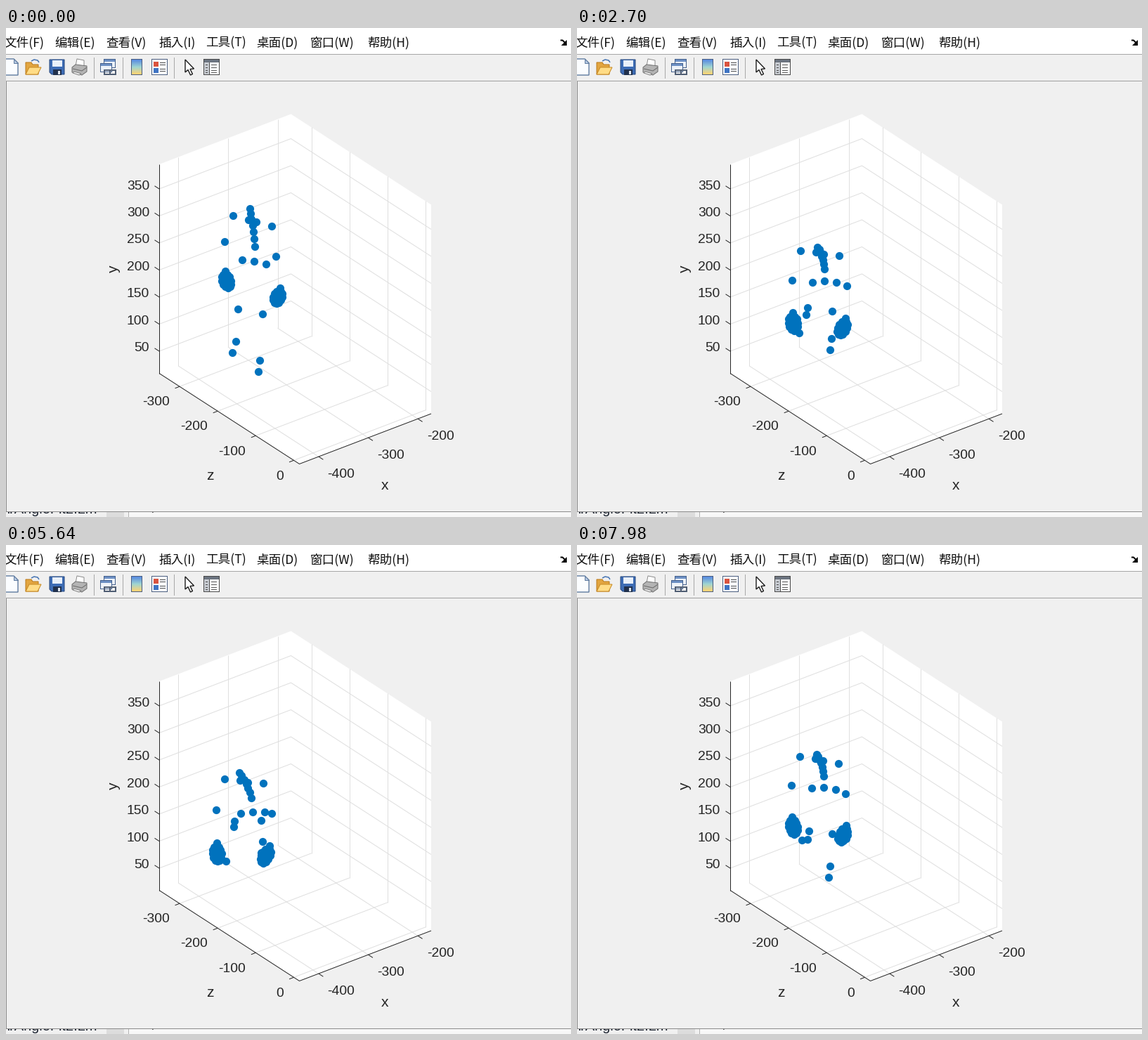
A matplotlib script for the animation above (8000 ms loop, 804 by 696 pixels).

```python
import numpy as np
import matplotlib.pyplot as plt
from matplotlib.animation import FuncAnimation
from matplotlib.patches import Polygon, Rectangle

W, H, DPI = 804, 696, 96
LOOP, STEP = 8000, 50
INK, BLUE, PANEL, GRID = "#262626", "#0072BD", "#f0f0f0", "#dfdfdf"
PT = 72 / DPI

plt.rcParams["toolbar"] = "None"
fig = plt.figure(figsize=(W / DPI, H / DPI), dpi=DPI)
ax = fig.add_axes([0, 0, 1, 1])
ax.set_xlim(0, W)
ax.set_ylim(H, 0)
ax.axis("off")


# ---------- drawing helpers (pixel coordinates) ----------
def box(x0, y0, x1, y1, fill, edge=None, z=1):
    """Fill whole pixels x0..x1, y0..y1, with an optional one-pixel edge."""
    if edge:
        box(x0, y0, x1, y1, edge, z=z)
        x0, y0, x1, y1 = x0 + 1, y0 + 1, x1 - 1, y1 - 1
    ax.add_patch(Rectangle((x0, y0), x1 - x0 + 1, y1 - y0 + 1,
                           fc=fill, lw=0, zorder=z, antialiased=False))


def poly(pts, fill, edge="none", lw=1, z=1):
    ax.add_patch(Polygon(pts, closed=True, fc=fill, ec=edge, lw=lw * PT, zorder=z))


def line(pts, color, lw=1, z=1):
    xs, ys = zip(*pts)
    ax.plot(xs, ys, color=color, lw=lw * PT, zorder=z, solid_capstyle="butt")


def text(x, y, s, px, font="Liberation Sans", color=INK, ha="left", z=1, **kw):
    ax.text(x, y, s, fontsize=px * PT, family=font, color=color, ha=ha,
            va=kw.pop("va", "baseline"), zorder=z, **kw)


# ---------- window ----------
def draw_window():
    box(0, 680, 803, 695, PANEL, z=0)
    box(143, 680, 167, 695, "#dcdcdc", z=0)
    box(174, 680, 803, 695, "#f7f7f7", z=0)
    box(174, 680, 174, 695, "#b4b4b4", z=0)
    text(-5, 691, "nrAngleFit2.Lm", 20, color="#1d2430", z=0.2)
    text(207, 690, "r", 16, color="#444444", z=0.2)
    box(0, 0, 803, 687, PANEL, z=0.5)
    box(0, 688, 803, 688, "#8c8c8c", z=0.5)
    box(0, 0, 803, 36, "white")
    box(0, 37, 803, 37, "#a6a6a6")
    box(0, 75, 803, 75, "#a0a0a0")
    box(0, 76, 0, 687, "#8c8c8c")
    menu = [(-2, "文件(F)"), (70, "编辑(E)"), (143, "查看(V)"), (218, "插入(I)"),
            (285, "工具(T)"), (357, "桌面(D)"), (434, "窗口(W)"), (515, "帮助(H)")]
    for x, s in menu:
        text(x - 0.7, 26.8, s, 17.6, font="Noto Sans CJK JP", color="#101010")
    line([(789, 17.5), (792, 17.5), (796, 21.5)], "black", 2)
    poly([(798, 17), (798, 25), (790, 25)], "black")


def draw_toolbar():
    for x in (125, 166, 239):
        box(x, 42, x, 71, "#a8a8a8")
    # new page
    poly([(-2, 44), (11, 44), (17, 50), (17, 67), (-2, 67)], "#fbfdff", "#5f7ba0", 1.4)
    poly([(11, 44), (11, 50), (17, 50)], "#b9cbe4", "#5f7ba0")
    # folder
    poly([(28, 66), (28, 49), (36, 49), (38, 52), (46, 52), (46, 66)],
         "#e2a540", "#b97818")
    poly([(28, 66), (33, 56), (50, 56), (45, 66)], "#ffdc86", "#c88a24")
    line([(36, 47), (40, 45), (45, 46), (47, 49)], "#4b78b4", 1.6)
    # disk
    poly([(62, 45), (83, 45), (83, 66), (65, 66), (62, 63)], "#3d6cb5", "#26477e")
    box(66, 46, 79, 54, "#e9f0fa")
    box(67, 59, 78, 66, "#20304c")
    box(74, 61, 76, 65, "#dfe6f0")
    # printer
    poly([(99, 54), (101, 44), (111, 46), (111, 55)], "white", "#8c8c8c")
    poly([(94, 56), (99, 52), (115, 54), (115, 62), (108, 67), (94, 63)],
         "#b4b4b4", "#707070")
    line([(95, 58), (108, 61), (115, 56)], "#6a6a6a")
    poly([(97, 62), (107, 65), (104, 67), (95, 64)], "#f3f3f3", "#808080")
    # linked windows
    for x, y in ((139, 44), (134, 50)):
        box(x, y, x + 16, y + 12, "#eef3fa", "#45618d")
        box(x + 1, y + 1, x + 15, y + 3, "#6d90c4")
    for x in (140, 148):
        ax.add_patch(Rectangle((x, 60), 8, 6, fill=False, ec="#4f5d73", lw=2 * PT))
    # colour bar
    cool, pale, warm = map(np.array, ((.35, .55, .88), (.62, .83, .82), (1, .83, .45)))
    box(178, 44, 193, 66, "white", "#4c5f80")
    for k in range(21):
        u = k / 10
        c = cool + (pale - cool) * u if u < 1 else pale + (warm - pale) * (u - 1)
        box(179, 45 + k, 192, 45 + k, tuple(c))
    # legend
    box(207, 44, 229, 66, "#fafcff", "#4c5f80")
    box(210, 48, 216, 54, "#d9533f")
    box(210, 57, 216, 63, "#3f74c4")
    for y in (49, 52, 58, 61):
        box(219, y, 226, y, "#4a4a4a")
    # pointer
    poly([(255, 45), (255, 63), (259, 59.5), (262.5, 67), (265.5, 65.5),
          (262, 58.5), (267.5, 58)], "white", "#1c1c1c", 1.4)
    # inspector
    box(281, 44, 303, 66, "#fafafa", "#4a4a4a")
    box(282, 45, 302, 48, "#6c7480")
    box(282, 49, 288, 65, "#c8ccd2")
    box(289, 49, 289, 65, "#4a4a4a")
    for y in (52, 56, 60, 63):
        box(284, y, 286, y, "#4a4a4a")
        box(292, y, 299, y, "#5a5a5a")


# ---------- 3D axes ----------
LEFT, FRONT, RIGHT = (np.array(p) for p in ((218, 491.5), (417.5, 620.5), (605, 549)))
UP = np.array([0, -297.5])
XDIR, ZDIR = RIGHT - FRONT, LEFT - FRONT
BACK = FRONT + XDIR + ZDIR


def draw_axes():
    poly([LEFT, LEFT + UP, BACK + UP, RIGHT + UP, RIGHT, FRONT], "white")
    for k in range(3):
        f = 0.146 + 0.3765 * k
        a, b = FRONT + f * XDIR, LEFT + f * XDIR
        line([a, b], GRID)
        line([b, b + UP], GRID)
        line([a, a + (6.5, 4.2)], INK, z=3)
        text(457 + 71 * k, 640 - 27 * k, str(100 * k - 400), 19.2)
    for k in range(4):
        f = 0.04 + 0.2715 * k
        a, b = FRONT + f * ZDIR, RIGHT + f * ZDIR
        line([a, b], GRID)
        line([b, b + UP], GRID)
        line([a, a + (-6.5, 2.5)], INK, z=3)
        text(395 - 54 * k, 643 - 35.3 * k, str(-100 * k), 19.2, ha="right")
    for k in range(7):
        rise = (0, -31.5 - 38.5 * k)
        a, b, c = LEFT + rise, BACK + rise, RIGHT + rise
        line([a, b, c], GRID)
        line([a, a + (-6.5, -4.2)], INK, z=3)
        text(204, 460 - 38.4 * k, str(50 + 50 * k), 19.2, ha="right")
    line([LEFT + UP, LEFT], INK, z=3)
    line([LEFT, FRONT, RIGHT], INK, z=3)
    text(539, 657, "x", 21, ha="center")
    text(290, 643, "z", 21, ha="center")
    text(153, 343, "y", 21, ha="center", va="center", rotation=90)


# ---------- moving figure ----------
LOW = 5640  # time of the deepest crouch

# joint: standing point, travel to the crouch, sideways bow of the path
TORSO = {
    "crown": ((347, 257), (-15, 67), (3, 3)),
    "chest": ((351, 281), (-9, 59), (2, -4)),
    "waist": ((354, 311), (-5, 49), (0, -10)),
    "pelvis": ((353, 332), (-2, 48), (0, -14)),
}
LEGS = {
    "knee_l": ((330, 400), (-17, 50), (0, -8)),
    "ankle_l": ((327, 446), (-2, -53), (5, -8)),
    "knee_r": ((365, 407), (-2, -15), (0, 13)),
    "ankle_r": ((361, 473), (4, -51), (-3, 14)),
}


def crouch(t):
    """0 standing, 1 lowest: slow settling down, late quick rise."""
    if t < LOW:
        return 1 - (1 - t / LOW) ** 2.4
    return 1 - 0.45 * ((t - LOW) / 2340) ** 3.8


def lean(t):
    if t < LOW:
        return (t / LOW) ** 1.2
    return 1 - 0.4 * np.sin(np.pi / 2 * min(1, (t - LOW) / 1240))


def place(joint, sx, sy):
    start, travel, bow = map(np.array, joint)
    return start + travel * (sx, sy) + bow * 4 * sy * (1 - sy)


def spine(waist, chest, crown):
    """Parabola through the three joints."""
    return [waist * (1 - u) * (1 - 2 * u) + chest * 4 * u * (1 - u) + crown * u * (2 * u - 1)
            for u in np.linspace(0, 1, 7)]


def hand(wrist, reach):
    """Wrist plus an oval of finger joints around the line of reach."""
    ring = np.linspace(0, 2 * np.pi, 12, endpoint=False)
    oval = [wrist + (0.58 + 0.42 * np.cos(a)) * reach + (6.5 * np.sin(a) - 0.8, 0)
            for a in ring]
    core = [wrist + u * reach for u in (0, 0.3, 0.5, 0.7)]
    return oval + core


def arm(shoulder, upper, lower, reach):
    elbow = shoulder + upper
    return [shoulder, elbow] + hand(elbow + lower, np.array(reach))


def dots_at(t):
    s, tilt = crouch(t), lean(t)
    crown, chest, waist, pelvis = (place(j, tilt, s) for j in TORSO.values())
    knee_l, ankle_l, knee_r, ankle_r = (place(j, s, s) for j in LEGS.values())
    collar = chest + (-0.5 - 3 * s, -6.5 + 3 * s)
    girdle = np.array([27.5, 7.5 - 4.5 * s])

    pts = spine(waist, chest, crown) + [pelvis]
    for side in (-1, 1):
        pts.append(pelvis + side * np.array([17, 3 - 4 * s]) + (0, 1.7))
        pts.append(collar + side * np.array([5.5, 1.5]))
    pts += arm(collar - girdle, (-12, 37 + 7 * s), (1, 42 + 5 * s), (5 - 3 * s, 24 + 2 * s))
    pts += arm(collar + girdle, (6 + 6 * s, 43), (6 - 9 * s, 45.5), (-4 - 4 * s, 22 + 3 * s))
    pts += [knee_l, ankle_l, ankle_l + (4 * s - 5, 16 - 8 * s)]
    pts += [knee_r, ankle_r, ankle_r + (-2, 16)]
    return np.array(pts) - 0.4


draw_window()
draw_toolbar()
draw_axes()
dots = ax.scatter(*dots_at(0).T, s=(11.2 * PT) ** 2, c=BLUE, linewidths=0, zorder=5)


def update(i):
    dots.set_offsets(dots_at(i * STEP))
    return [dots]


anim = FuncAnimation(fig, update, frames=LOOP // STEP, interval=STEP,
                     init_func=lambda: update(0), repeat=True, repeat_delay=0)
plt.show()
```
